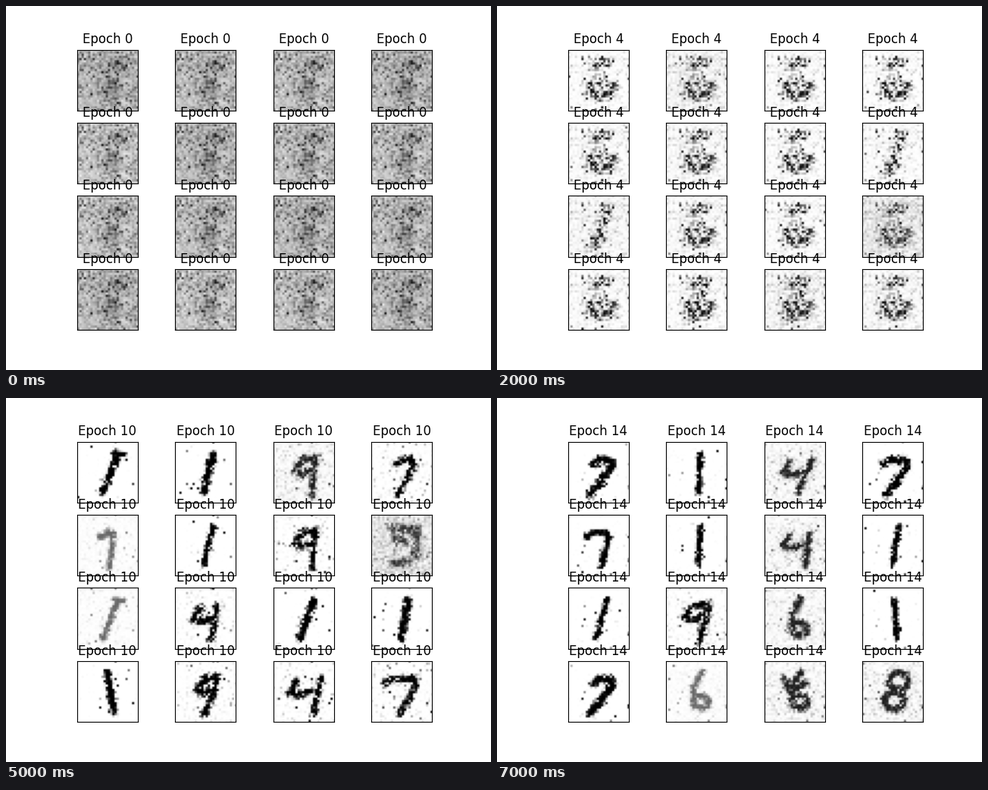
These frames come from a looping animation (640 by 480 pixels, 8 s). A matplotlib script:

```python
import numpy as np
import matplotlib.pyplot as plt
from matplotlib.animation import FuncAnimation

N = 28
GY, GX = np.mgrid[0:N, 0:N].astype(float)

# Pen styles: width, gain, roughness, darkness
BOLD = (2.1, 2.2, 1.0, 1)
THIN = (1.6, 2.0, 1.0, 1)
ROUGH = (1.7, 1.4, 1.4, 1)
SOFT = (1.7, 0.85, 1.3, 0.9)
PALE = (1.6, 1.0, 1.0, 0.6)
HAZE = (2.2, 0.45, 1.6, 0.85)


# Shapes are lists of polylines on the 28 x 28 grid.
def one(lean, *extra):
    return [[(14.7 + lean, 5.5), (14.7 - lean, 22.5)], *extra]


def seven(left, right, foot):
    return [[(left, 10), (left + 3, 8), (right - 1, 8), (right, 11), (foot, 24)]]


def nine(left, right, foot):
    return [[(right, 7), (left + 3, 8), (left, 13), (left + 3, 14.5),
             (right - 1, 12), (foot, 24)], [(right, 7), (right - 1, 12)]]


def four(left, right, foot):
    return [[(left + 3, 9), (left, 14), (left + 4, 15), (right - 1, 13)],
            [(right, 8), (foot, 23)]]


def ring(x, y, rx, ry):
    a = np.linspace(0, 2 * np.pi, 13)
    return list(zip(x + rx * np.cos(a), y + ry * np.sin(a)))


FLAG = [(11, 9), (14, 6.5)]
TIP = [(17, 5), (20, 5.5)]
CLOUD = [[(12, 10), (20, 8)], [(15, 11), (13.5, 22)]]
SNOWMAN = [[(12, 6.5), (17, 5)], ring(14.5, 17.5, 5.5, 3.5)]
SMUDGE = [[(17, 5), (17, 10), (14, 14), (14, 18), (11, 23)]]
THREE = [[(10, 5), (16, 5), (17, 9), (12, 10)], [(9, 15), (10, 20), (15, 21), (21, 20)]]
BARS = [[(9, 6), (18, 6)], [(11, 11), (15, 12)], [(10, 22), (16, 21)], [(20, 7), (20, 19)]]
EIGHT = [ring(16, 9, 4.5, 4), ring(14, 18, 4.5, 4)]
SIX = [[(16, 5), (12, 12), (12, 18)], ring(15.5, 18.5, 3.5, 3)]
DOUBLE_SIX = SIX + [[(9, 8), (11, 14), (18, 10)]]
CROSS = [[(20, 6), (14, 13), (8, 22)], [(10, 9), (14, 13), (18, 20)]]


def distance(strokes):
    best = np.full((N, N), 99.0)
    for line in strokes:
        for (x0, y0), (x1, y1) in zip(line, line[1:]):
            dx, dy = x1 - x0, y1 - y0
            t = ((GX - x0) * dx + (GY - y0) * dy) / (dx * dx + dy * dy)
            t = np.clip(t, 0, 1)
            best = np.minimum(best, np.hypot(GX - x0 - t * dx, GY - y0 - t * dy))
    return best


def grain(rng, pepper):
    spikes = (rng.random((N, N)) < pepper) * rng.uniform(2.5, 6, (N, N))
    return rng.normal(size=(N, N)), spikes


def render(cells, seed, own=0.7, pepper=0.006, peak=4):
    """Draw each (shape, pen) cell; `own` is the share of grain unique to it."""
    rng = np.random.default_rng(seed)
    noise, spikes = grain(rng, pepper)
    images = []
    for strokes, (width, gain, rough, dark) in cells:
        noise2, spikes2 = grain(rng, pepper * own)
        mixed = np.sqrt(1 - own ** 2) * noise + own * noise2
        body = np.exp(-(distance(strokes) / width) ** 2)
        z = (peak + 4) * body - 4 + rough * (1 + body) * mixed + spikes + spikes2
        v = 1 / (1 + np.exp(-gain * z))
        images.append(dark * (v - v.min()) / (v.max() - v.min()))
    return images


def static(seed):
    rng = np.random.default_rng(seed)
    low = np.exp(-((GX - 15) / 4) ** 2 - ((GY - 18) / 5) ** 2)
    high = np.exp(-((GX - 17) / 6) ** 2 - ((GY - 7) / 4) ** 2)
    speck = rng.exponential(size=(N, N)) * (1 + low + 0.5 * high)
    base = 0.17 + 0.13 * speck + 0.04 * rng.normal(size=(N, N)) + 0.2 * low + 0.1 * high
    return [np.clip(base + rng.uniform(-0.03, 0.03) + 0.015 * rng.normal(size=(N, N)), 0, 0.9)
            for _ in range(16)]


def clouds(shapes, width, seed, gain):
    """Nearly equal cells that differ mainly in contrast."""
    rng = np.random.default_rng(seed)
    cells = [(s, (width, rng.uniform(0.5, gain), 1.3, 1)) for s in shapes]
    return render(cells, seed, own=0.12, pepper=0.025, peak=-0.3)


early = [SNOWMAN] * 16
early[7] = early[8] = SMUDGE
early[13] = early[14] = SNOWMAN + SMUDGE

digits8 = [
    (seven(9, 19.5, 15), ROUGH), (THREE, HAZE), (EIGHT, HAZE), (one(-0.5, FLAG), ROUGH),
    (one(2), BOLD), (one(-0.5, FLAG), BOLD), (nine(11, 20, 13), HAZE), (EIGHT, HAZE),
    (one(2.7), BOLD), (CROSS, HAZE), (one(2.3), BOLD), (seven(9, 18, 12), ROUGH),
    (one(2), BOLD), (nine(12, 18, 15), HAZE), (one(0), ROUGH), (nine(8, 20, 12), ROUGH),
]
digits10 = [
    (one(3.5, TIP), BOLD), (one(2), BOLD), (nine(9.5, 19, 17), SOFT), (seven(11, 19, 11.5), ROUGH),
    (seven(10, 16, 14), PALE), (one(2), THIN), (nine(9.5, 19, 17), ROUGH), (BARS, HAZE),
    (one(3.5, TIP), PALE), (four(8, 19, 16), ROUGH), (one(3), BOLD), (one(1.5), BOLD),
    (one(-1.5), BOLD), (nine(10, 19, 13), ROUGH), (four(7, 21, 18), ROUGH),
    (seven(5.5, 20, 12.5), ROUGH),
]
digits14 = [
    (seven(11, 19.5, 9.5), BOLD), (one(0.5), THIN), (four(8, 21, 15), SOFT), (seven(9, 20, 10.5), BOLD),
    (seven(8, 18, 14.5), THIN), (one(0.5), THIN), (four(8, 20, 18), SOFT), (one(1.5), THIN),
    (one(2.5), THIN), (nine(8, 19, 15), ROUGH), (SIX, SOFT), (one(-0.5), THIN),
    (seven(11, 19.5, 9.5), BOLD), (SIX, PALE), (DOUBLE_SIX, SOFT), (EIGHT, SOFT),
]
# In-between epochs: a blurrier set of the next digits, and a mix of the neighbours.
digits6 = [(s, (w * 1.2, g * 0.7, r * 1.1, d)) for s, (w, g, r, d) in digits8]
digits12 = [pair[k % 2] for k, pair in enumerate(zip(digits14, digits10))]

EPOCHS = [
    static(3),
    clouds([CLOUD] * 16, 4.5, 12, 1.3),
    clouds(early, 2.7, 14, 1.2),
    render(digits6, 16, pepper=0.008),
    render(digits8, 18, pepper=0.003),
    render(digits10, 20, pepper=0.008),
    render(digits12, 22, pepper=0.008),
    render(digits14, 24, pepper=0.008),
]

fig, axes = plt.subplots(4, 4, figsize=(6.4, 4.8), dpi=100)
pictures, titles = [], []
for ax in axes.flat:
    pictures.append(ax.imshow(np.zeros((N, N)), cmap="gray_r", vmin=0, vmax=1))
    titles.append(ax.set_title("Epoch 0"))
    ax.set_xticks([])
    ax.set_yticks([])


def draw(i):
    for picture, title, image in zip(pictures, titles, EPOCHS[i]):
        picture.set_data(image)
        title.set_text(f"Epoch {2 * i}")
    return pictures + titles


anim = FuncAnimation(fig, draw, frames=len(EPOCHS), interval=1000, repeat=True)
plt.show()
```
